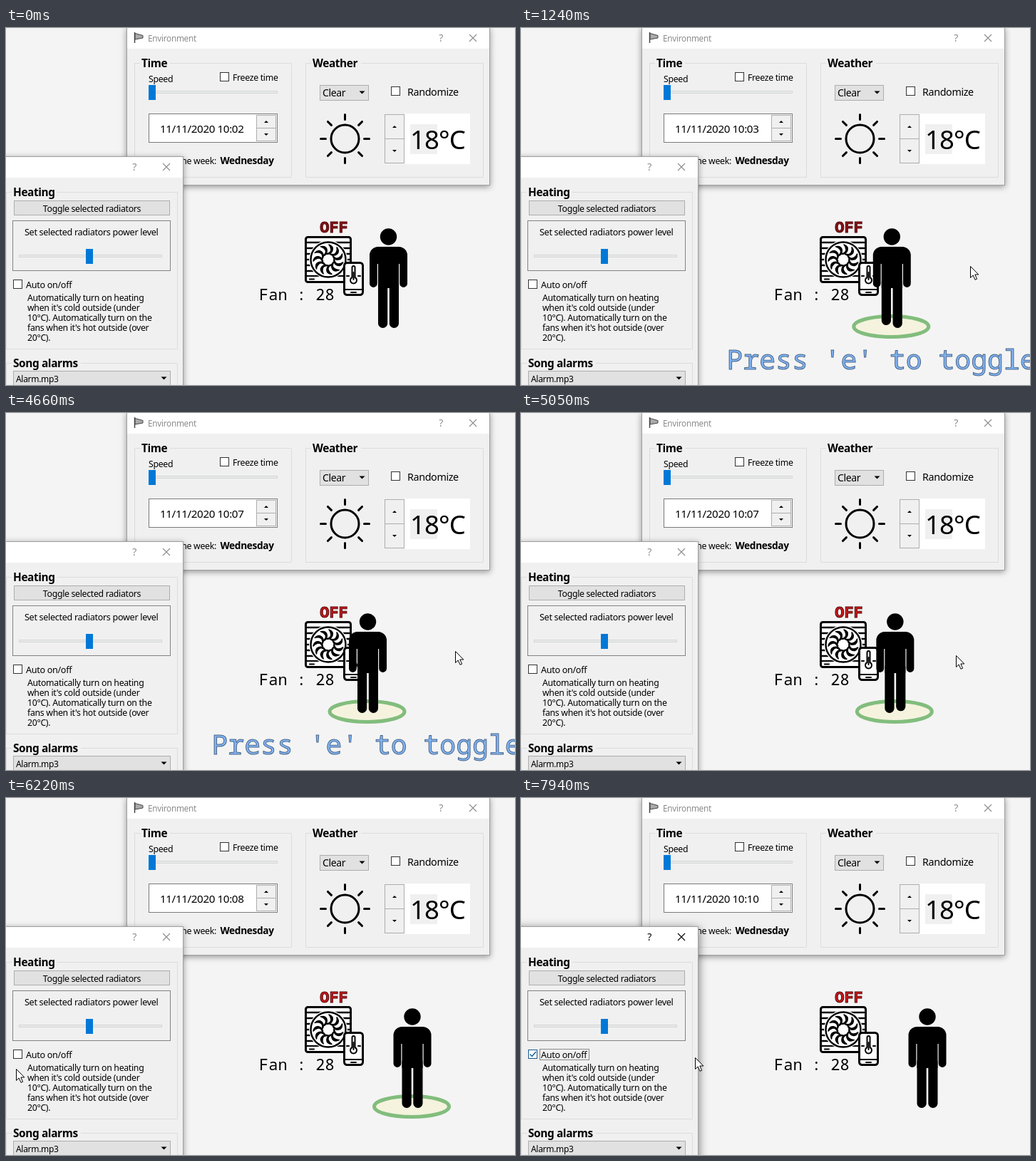
These frames come from a looping animation (714x501 px, 8 s). An HTML page:

```html
<!DOCTYPE html>
<html lang="en">
<head>
<meta charset="utf-8">
<title>Environment simulator</title>
<style>
  html, body { margin: 0; width: 100%; height: 100%; overflow: hidden; background: #f4f4f4; }
  svg { display: block; }
  text { font: 12.3px "Noto Sans", sans-serif; letter-spacing: -.025em; white-space: pre; }
  .bold { font-weight: 700; }
  .mono { font-family: "Noto Sans Mono", monospace; letter-spacing: 0; }
  .window { filter: drop-shadow(0 2px 4px rgba(0, 0, 0, .4)); }
  .window.active { filter: drop-shadow(0 3px 7px rgba(0, 0, 0, .55)); }
  .buttons { fill: #8c8c8c; stroke: #8c8c8c; }
  .active .buttons { fill: #000; stroke: #000; }
  #hint { font-weight: 500; }
</style>
</head>
<body>
<svg id="stage" width="714" height="501" viewBox="0 0 714 501"></svg>
<script>
const LOOP = 8000;
const stage = document.getElementById('stage');

const box = (x, y, w, h, fill, stroke, extra = '') =>
  `<rect x="${x + .5}" y="${y + .5}" width="${w - 1}" height="${h - 1}" fill="${fill}" stroke="${stroke}" ${extra}/>`;
const label = (x, y, text, size = 12.3, extra = '') =>
  `<text x="${x}" y="${y}" style="font-size:${size}px" ${extra}>${text}</text>`;
const button = (x, y, w, h, fill = '#e1e1e1') => box(x, y, w, h, fill, '#adadad');
const checkbox = (x, y, extra) => box(x, y, 13, 13, '#fff', '#333', extra);
const arrow = (x, y, dir, size = 3) =>
  `<path d="M${x - size} ${y - dir * size / 2}h${2 * size}l${-size} ${dir * size}z"/>`;
const combo = (x, y, w, h, text, size) =>
  button(x, y, w, h) + label(x + 4, y + 16, text, size) + arrow(x + w - 9.5, y + 10.5, 1, 4);
const spinner = (x, y, w, h) =>
  button(x, y, w, h, '#f0f0f0') + button(x, y + h - 1, w, h, '#f0f0f0') +
  arrow(x + w / 2, y + h / 2, -1) + arrow(x + w / 2, y + h * 1.5 - 1, 1);
const slider = (x, y, w, handle) =>
  box(x, y - 2, w, 4, '#e7eaea', '#d6d6d6') +
  `<rect x="${handle}" y="${y - 10}" width="10" height="21" fill="#0078d7"/>`;
const group = (x, y, right, bottom, title, titleX, titleEnd) =>
  `<path d="M${titleX - 2} ${y + .5}H${x + .5}V${bottom}H${right + .5}V${y + .5}H${titleEnd + 3}" fill="none" stroke="#dcdcdc"/>` +
  label(titleX, y + 6, title, 15.4, 'class="bold"');
const win = (id, x, y, w, h, content) => `
  <g id="${id}" class="window">
    ${box(x, y, w, h, '#f0f0f0', '#a0a0a0')}
    <rect x="${x + 1}" y="${y + 1}" width="${w - 2}" height="29" fill="#fff"/>
    <g class="buttons">
      ${label(x + w - 69, y + 19.5, '?', 14, 'text-anchor="middle" stroke="none"')}
      <path d="M${x + w - 29} ${y + 10}l10 10m0-10l-10 10" fill="none" stroke-width="1.1"/>
    </g>
    ${content}
  </g>`;
const spokes = (count, path) => Array.from({ length: count }, (_, i) =>
  `<path d="${path}" transform="rotate(${i * 360 / count})"/>`).join('');

const sun = `
  <g transform="translate(475.5 155.5)" fill="none" stroke="#000" stroke-width="3" stroke-linecap="round">
    <circle r="19.5"/>${spokes(8, 'M0-27V-34')}
  </g>`;

const grille = Array.from({ length: 6 }, (_, i) => `M423 ${301 + i * 8}H481`).join('');
const fan = `
  <g stroke="#000" fill="#fff" stroke-width="3" stroke-linecap="round" stroke-linejoin="round">
    <rect x="420.5" y="293.5" width="63" height="63" rx="3"/>
    <path d="${grille}" stroke-width="2.4"/>
    <path d="M421 348H483M426 352.5H432" stroke-width="2.2"/>
    <g transform="translate(452 325)" stroke-width="2.4">
      <circle r="27" stroke="none"/><circle r="24.5"/>
      <g fill="#000" stroke-width="1.6">${spokes(11, 'M-3-8C1-9 4-10 4-14C4-17 3-19 1-21C6-19 7-16 6-13C5-10 2-7-3-8Z')}</g>
    </g>
    <rect x="474.5" y="329.5" width="26" height="45" rx="4"/>
    <path d="M475 367H500M484 371H491" stroke-width="2"/>
    <path d="M485.5 336a2 2 0 0 1 4 0V350a4.5 4.5 0 1 1-4 0Z" stroke-width="2"/>
    <path d="M487.5 343V353" stroke-width="2"/>
    <path d="M478 348h3m13 0h3" stroke-width="2.2"/>
  </g>`;

const man = `
  <g id="man">
    <ellipse id="ring" cx="-1" cy="138" rx="52.5" ry="14.5" fill="#f5f3de" stroke="#82bd7d" stroke-width="5"/>
    <circle cy="12" r="11.7"/>
    <path d="M-26.5 38A12 12 0 0 1-14.5 26H14.5A12 12 0 0 1 26.5 38V77.5a5.4 5.4 0 0 1-10.8 0V50h-1.2V84h-29V50h-1.2V77.5a5.4 5.4 0 0 1-10.8 0Z"/>
    <g stroke="#000" stroke-width="13.2" stroke-linecap="round">
      <line id="leftLeg" x1="-7.9" x2="-7.9" y1="75"/>
      <line id="rightLeg" x1="7.9" x2="7.9" y1="75"/>
    </g>
  </g>`;

const environment = win('environment', 169, -1, 510, 222, `
  <path d="M180.5 6V21" stroke="#444" stroke-width="1.5"/>
  <path d="M181 7.5L192 10.5V14L181 16Z" fill="#aaa" stroke="#444"/>
  ${label(199, 19, 'Environment', 11.8, 'fill="#8c8c8c"')}
  ${group(180, 49, 400, 209.5, 'Time', 190, 227)}
  ${label(200, 76, 'Speed')}
  ${checkbox(300, 62)}${label(318, 74, 'Freeze time')}
  ${slider(200, 90, 181, 200)}
  ${box(200, 120, 181, 41, '#fff', '#7a7a7a')}
  ${label(216, 147, '', 15.2, 'id="clock"')}
  ${spinner(351, 122, 28, 19)}
  ${label(295, 191, 'Day of the week:', 12.3, 'text-anchor="end"')}
  ${label(300.5, 191, 'Wednesday', 13.7, 'class="bold"')}
  ${group(420, 49, 669, 209.5, 'Weather', 430, 495)}
  ${combo(440, 80, 69, 22, 'Clear', 14)}
  ${checkbox(540, 82)}${label(563, 95, 'Randomize', 14.3)}
  ${sun}
  <rect x="559" y="120" width="92" height="71" fill="#fff"/>
  <rect x="567" y="135" width="38" height="42" fill="#f0f0f0"/>
  ${spinner(531, 121, 28, 35)}
  ${label(567, 170, '18°C', 36.5)}`);

const advice = ['Automatically turn on heating', "when it's cold outside (under", '10°C). Automatically turn on the',
  "fans when it's hot outside (over", '20°C).'];
const dashboard = win('dashboard', -20, 180, 269, 340, `
  ${group(0, 230, 240, 450.5, 'Heating', 10, 69)}
  ${button(11, 242, 219, 21)}
  ${label(120.5, 258, 'Toggle selected radiators', 12.3, 'text-anchor="middle"')}
  ${box(9, 270, 222, 71, 'none', '#828282')}
  ${label(26, 291, 'Set selected radiators power level', 12.6)}
  ${slider(18, 320, 201, 112)}
  ${checkbox(10, 353, 'id="autoBox"')}
  <path id="tick" d="M12.5 359.5L15.5 362.5L21 356" fill="none" stroke="#17598f" stroke-width="1.4"/>
  ${label(28, 365, 'Auto on/off', 12.6)}
  ${box(26, 352, 70, 16, 'none', '#222', 'id="focus" stroke-dasharray="1 1"')}
  ${advice.map((line, i) => label(30, 383 + 14 * i, line)).join('')}
  ${group(0, 470, 240, 510, 'Song alarms', 10, 102)}
  ${combo(10, 481, 221, 21, 'Alarm.mp3', 12)}`);

stage.innerHTML = `
  <rect width="714" height="501" fill="#f4f4f4"/>
  ${label(460, 286.5, '', 22, 'id="power" class="mono bold" text-anchor="middle"')}
  ${fan}
  ${label(355, 382, 'Fan : 28', 22, 'class="mono"')}
  ${man}
  ${label(288.5, 479, "Press 'e' to toggle", 38.1, 'id="hint" class="mono" fill="#80b5f6" stroke="#4a6486"')}
  ${environment}${dashboard}
  <path id="cursor" d="M.5.5V16.5L4.2 13L7 19.3L9.6 18.2L6.8 12H11.8Z" fill="#fff" stroke="#000"/>`;

const el = Object.fromEntries([...stage.querySelectorAll('[id]')].map(node => [node.id, node]));
const show = (node, visible) => node.setAttribute('visibility', visible ? 'visible' : 'hidden');

// Keys are [time, x, y], joined by straight moves.
const manKeys = [[1090, 536.5, 281], [1360, 507.5, 281], [4890, 507.5, 281], [5340, 556, 281], [5470, 570, 295]];
const cursorKeys = [[70, 590, 479], [400, 612, 345], [540, 615, 322], [700, 615, 322], [790, 630, 334],
  [4890, 630, 334], [5370, 569, 351], [5680, 205, 425], [5950, 80, 415], [6220, 14, 380], [6380, 16, 371],
  [6530, 16, 371], [6690, 17, 367], [6920, 17, 367], [7100, 6, 351], [7310, 13, 358], [7640, 13, 358], [7940, 244, 364]];
const minuteTicks = [730, 1710, 2700, 3650, 4660, 5640, 6620, 7630];

function positionAt(keys, t) {
  const next = keys.findIndex(key => key[0] > t);
  if (next === 0) return keys[0].slice(1);
  if (next < 0) return keys[keys.length - 1].slice(1);
  const [t0, x0, y0] = keys[next - 1], [t1, x1, y1] = keys[next];
  const k = (t - t0) / (t1 - t0);
  return [x0 + (x1 - x0) * k, y0 + (y1 - y0) * k];
}

function draw(t) {
  const minute = 2 + minuteTicks.filter(tick => t >= tick).length;
  el.clock.textContent = `11/11/2020 10:${String(minute).padStart(2, '0')}`;

  const [manX, manY] = positionAt(manKeys, t);
  const walking = (t > 1090 && t < 1360) || (t > 4890 && t < 5470);
  const stride = walking ? 9 * Math.sin((t - 5270) / 200 * Math.PI) : 0;
  el.man.setAttribute('transform', `translate(${manX} ${manY})`);
  el.rightLeg.setAttribute('y2', 133.4 - Math.max(0, stride));
  el.leftLeg.setAttribute('y2', 133.4 - Math.max(0, -stride));
  show(el.ring, t >= 400 && t < 6530);
  show(el.hint, manX < 521);

  const on = t >= 2240 && t < 3180;
  el.power.textContent = on ? 'ON' : 'OFF';
  el.power.setAttribute('fill', on ? '#0d6417' : t < 2240 ? '#861013' : '#cc1719');
  el.power.setAttribute('stroke', on ? '#0a3d10' : '#560b0d');

  const checked = t >= 7630;
  el.dashboard.classList.toggle('active', t >= 6530);
  el.autoBox.setAttribute('stroke', t >= 7000 ? '#17598f' : '#333');
  show(el.tick, checked);
  show(el.focus, checked);

  const [x, y] = positionAt(cursorKeys, t).map(Math.round);
  el.cursor.setAttribute('transform', `translate(${x} ${y})`);
  show(el.cursor, t >= 70);
}

function loop() {
  draw(performance.now() % LOOP);
  requestAnimationFrame(loop);
}
loop();
</script>
</body>
</html>
```
